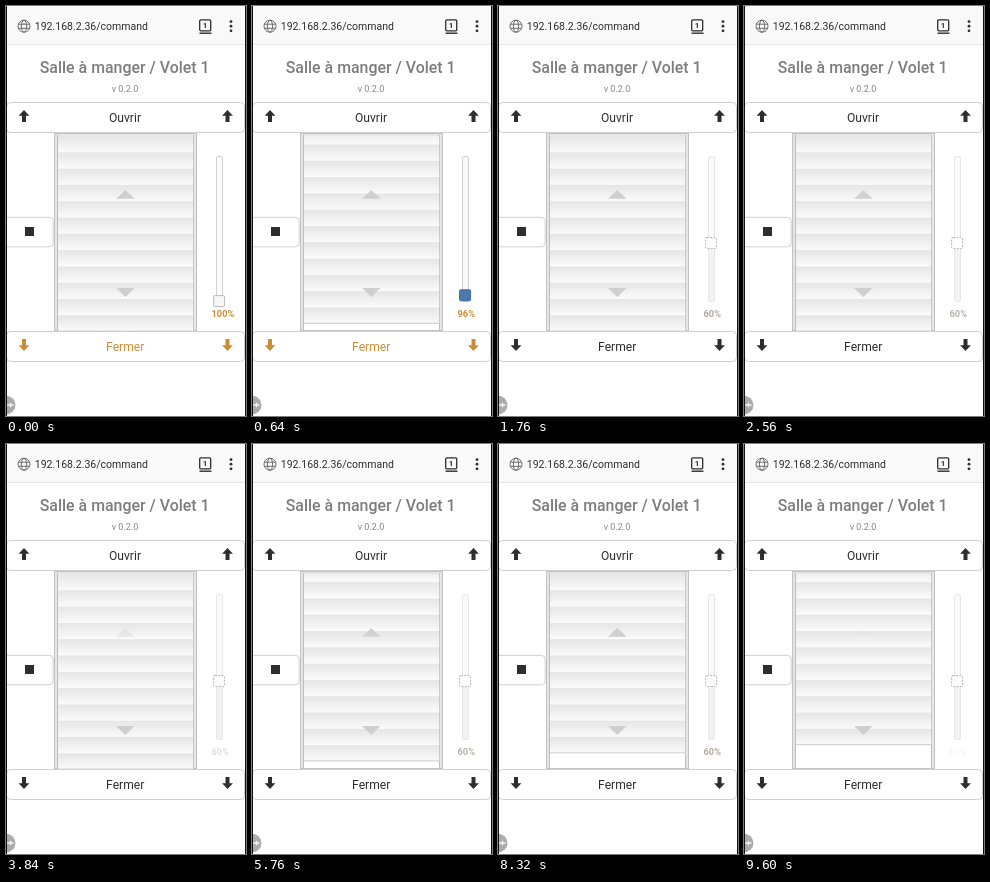
Recreate the animation shown at these times as an HTML page. Size 240 px wide and 410 px high, loop 9.76 s.

```html
<!DOCTYPE html>
<html lang="fr">
<head>
<meta charset="utf-8">
<title>Volet</title>
<style>
html, body { margin: 0; width: 100%; height: 100%; overflow: hidden; background: #fff; }
svg { display: block; width: 240px; height: 410px; font-family: Roboto, sans-serif; }
.mid { text-anchor: middle; }
.btn { fill: #fff; stroke: #d0d0d0; }
.ink { fill: #2e2e2e; }
#close.active { fill: #cc8c35; }
#track { fill: #fafafa; stroke: #d0d0d0; }
#fill { fill: #e4e4e4; }
#thumb { fill: #f6f6f6; stroke: #bbb; }
#label { fill: #cc8c35; font-size: 9.2px; font-weight: 700; }
.drag #thumb { fill: #4a7aad; stroke: #3f6c9c; }
.off #track { stroke: #e8e8e8; }
.off #fill { fill: #f2f2f2; }
.off #thumb { fill: #fdfdfd; stroke: #b5b5b5; stroke-dasharray: 2 1.3; }
.off #label { fill: #b3a9a0; }
.tri { fill: #cfcfcf; }
</style>
</head>
<body>
<svg viewBox="0 0 240 410">
  <defs>
    <linearGradient id="shade" x2="0" y2="1">
      <stop stop-color="#e5e5e5"/>
      <stop offset="1" stop-color="#fbfbfb"/>
    </linearGradient>
    <clipPath id="window"><rect x="52" y="130" width="135.5" height="195"/></clipPath>
    <path id="arrow" d="M0-6 5.4-.3H2V6H-2V-.3H-5.4Z"/>
  </defs>
  <rect width="240" height="410" fill="#fff"/>

  <rect width="240" height="38" fill="#f9f9f9"/>
  <path d="M0 38.5H240" stroke="#e6e6e6"/>
  <g fill="none" stroke="#6c6c6c">
    <circle cx="18" cy="20.2" r="6"/>
    <ellipse cx="18" cy="20.2" rx="2.6" ry="6"/>
    <path d="M12.5 18.2H23.5M12.5 22.3H23.5"/>
  </g>
  <text class="ink" x="28.8" y="24" font-size="10.5">192.168.2.36/command</text>
  <rect x="193.7" y="13.8" width="11" height="11" rx="1" fill="none" stroke="#2e2e2e" stroke-width="1.3"/>
  <path d="M193.5 27.2H205.5" stroke="#2e2e2e" stroke-width="1.4"/>
  <text class="mid ink" x="199" y="22.3" font-size="8" font-weight="700">1</text>
  <g class="ink">
    <circle cx="225" cy="15.6" r="1.4"/><circle cx="225" cy="20.2" r="1.4"/><circle cx="225" cy="24.8" r="1.4"/>
  </g>

  <text class="mid" x="118.7" y="67" font-size="15.9" font-weight="500" fill="#7d7d7d">Salle à manger / Volet 1</text>
  <text class="mid" x="119" y="86" font-size="9" fill="#858585">v 0.2.0</text>

  <rect x="48.5" y="127.5" width="142" height="197" fill="#e6e6e6" stroke="#c2c2c2"/>
  <rect x="52" y="130" width="135.5" height="194" fill="#fff"/>
  <path d="M51.5 129V324M187.5 129V324" stroke="#bdbdbd"/>
  <g clip-path="url(#window)">
    <g id="shutter"></g>
  </g>
  <path id="up" class="tri" d="M110 192.7 119.3 184 128.6 192.7Z"/>
  <path class="tri" d="M110 282 119.3 291 128.6 282Z"/>

  <rect class="btn" x=".5" y="96.5" width="238" height="30" rx="4"/>
  <g class="ink">
    <use href="#arrow" x="18" y="110"/><use href="#arrow" x="221.5" y="110"/>
    <text class="mid" x="119" y="115.5" font-size="12.1">Ouvrir</text>
  </g>
  <rect class="btn" x="-3" y="211.3" width="50.2" height="29.5" rx="4"/>
  <rect class="ink" x="19" y="221" width="9" height="9"/>
  <rect class="btn" x=".5" y="325.5" width="238" height="30" rx="4"/>
  <g id="close" class="ink">
    <use href="#arrow" transform="translate(18 339) scale(1 -1)"/>
    <use href="#arrow" transform="translate(221.5 339) scale(1 -1)"/>
    <text class="mid" x="119.2" y="345" font-size="12.1">Fermer</text>
  </g>

  <g id="slider">
    <rect id="track" x="210.5" y="150.5" width="6" height="145" rx="1.5"/>
    <rect id="fill" x="211" width="5"/>
    <rect id="thumb" x="207.6" width="11" height="11" rx="1.2"/>
    <text id="label" x="205.6" y="311.4"></text>
  </g>

  <circle cx=".3" cy="399" r="9.2" fill="#aeacaa"/>
  <path d="M1 399H7.5M4.5 396.8V401.2" stroke="#f4f4f4" stroke-width="1.3"/>
  <path d="M.5 0V410M239.5 0V410" stroke="#111"/>
</svg>
<script>
const LOOP = 9760, TICK = 160;
const TOP = 130, SLAT = 16.3, SLATS = 12, HEIGHT = SLAT * SLATS;
const DRAG = [100, 96, 89, 78, 67, 62, 60];
const PULSE = [.38, .04, .92, 1, 1];
const $ = id => document.getElementById(id);

function add(parent, name, attrs) {
  const el = document.createElementNS("http://www.w3.org/2000/svg", name);
  for (const k in attrs) el.setAttribute(k, attrs[k]);
  parent.append(el);
}

for (let i = 0; i < SLATS; i++) {
  add($("shutter"), "rect", { x: 52, y: TOP + i * SLAT, width: 135.5, height: SLAT, fill: "url(#shade)" });
}
add($("shutter"), "path", { d: `M52 ${TOP + HEIGHT - .5}H187.5`, stroke: "#ccc" });

// Slider value: idle, dragged, then held at its goal
function goal(t) {
  if (t < 480) return 100;
  return DRAG[Math.min(DRAG.length - 1, (t - 480) / TICK)];
}

// Pixels by which the shutter is raised
function lift(t) {
  if (t < 1760) return HEIGHT * (1 - goal(t) / 100);
  return SLAT / 2 * [4640, 6560, 8480].filter(s => t >= s).length;
}

function pulse(t) {
  return t < 2560 ? 1 : PULSE[(t / TICK + 1) % PULSE.length];
}

function draw(t) {
  const value = goal(t), y = 150 + value * 1.45, off = t >= 1600;
  $("shutter").setAttribute("transform", `translate(0 ${-lift(t)})`);
  $("thumb").setAttribute("y", y - 5.4);
  $("fill").setAttribute("y", y);
  $("fill").setAttribute("height", Math.max(0, 295 - y));
  $("label").textContent = value + "%";
  $("slider").setAttribute("class", off ? "off" : t >= 480 ? "drag" : "");
  $("close").setAttribute("class", off ? "ink" : "ink active");
  $("up").style.opacity = pulse(t);
  $("label").style.opacity = Math.max(.1, pulse(t));
}

const start = performance.now();
function loop(now) {
  const t = Math.max(0, now - start) % LOOP;
  draw(Math.floor(t / TICK) * TICK);
  requestAnimationFrame(loop);
}
draw(0);
requestAnimationFrame(loop);
</script>
</body>
</html>
```
